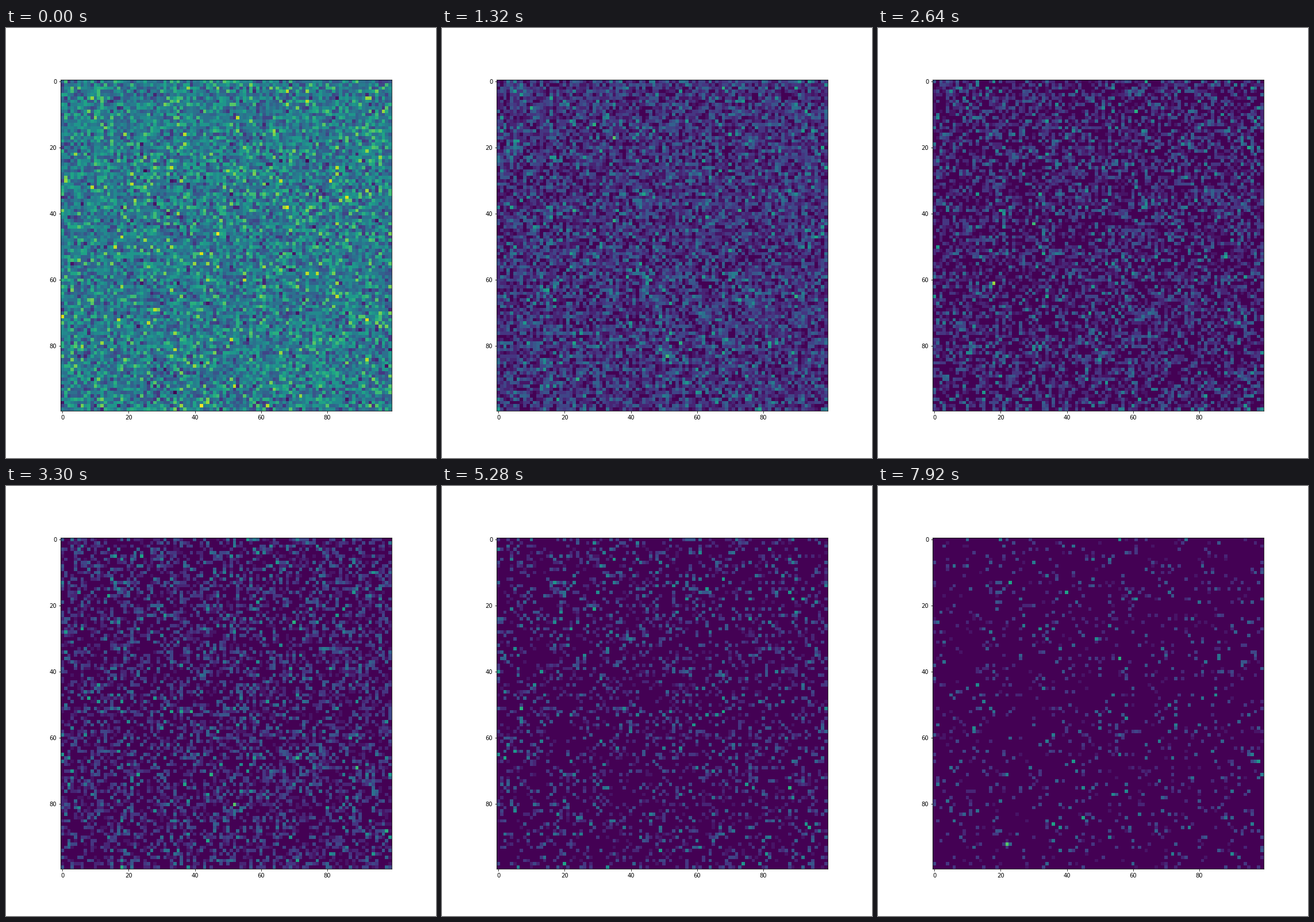
Recreate the animation shown at these times as a matplotlib script. Size 748x748 px, loop 8 s.

```python
import numpy as np
import matplotlib.pyplot as plt
from matplotlib.animation import FuncAnimation

STAGE, DPI = 748, 72
LOOP, TICK, HOLD = 8000, 20, 330   # milliseconds
SIZE = 100
START, TOP = 8, 19                 # mean head count, top of the colour scale
GROWTH, CAPACITY = 1.4, 7.5
STEPS = -(-LOOP // HOLD)


def grow(pop):
    """Expected offspring of a cell, damped by crowding; empty cells stay empty."""
    return GROWTH * pop / (1 + pop / CAPACITY)


def simulate(seed=7):
    rng = np.random.default_rng(seed)
    pop = rng.poisson(START, (SIZE, SIZE))
    history = [pop]
    for _ in range(STEPS - 1):
        pop = rng.poisson(grow(pop))
        history.append(pop)
    return history


history = simulate()

fig, ax = plt.subplots(figsize=(STAGE / DPI, STAGE / DPI), dpi=DPI)
image = ax.imshow(history[0], cmap="viridis", vmin=0, vmax=TOP,
                  interpolation="nearest")


def update(i):
    step = (i * TICK + TICK // 2) // HOLD
    image.set_data(history[min(step, STEPS - 1)])
    return [image]


anim = FuncAnimation(fig, update, frames=LOOP // TICK, interval=TICK,
                     init_func=lambda: update(0), repeat=True, repeat_delay=0)
plt.show()
```
